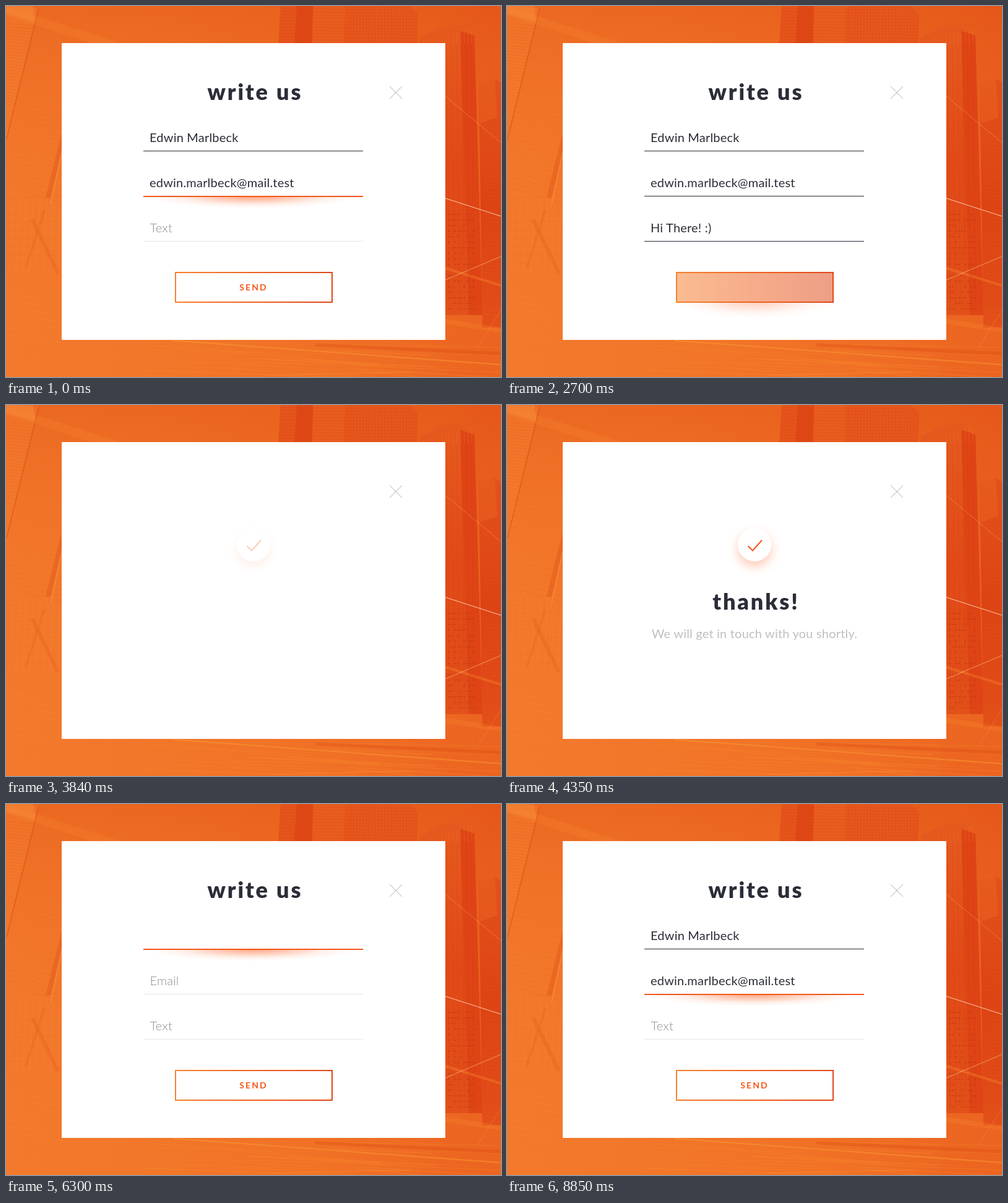
Write an HTML page with a canvas that moves like this. It is 800x600 px and loops after 8.88 s.

```html
<!DOCTYPE html>
<html lang="en">
<head>
<meta charset="utf-8">
<title>Write us</title>
<style>
html, body { margin: 0; width: 100%; height: 100%; overflow: hidden; background: #ee6b23; }
canvas, svg { position: absolute; left: 0; top: 0; display: block; }
text { font: 400 20px Lato, "Open Sans", sans-serif; letter-spacing: .2px; fill: #2b2d38; white-space: pre; }
.title { font-weight: 900; font-size: 36px; letter-spacing: 2.9px; text-anchor: middle; }
.hint { font-weight: 300; fill: #8c8c8c; }
.send { font-weight: 700; font-size: 14px; letter-spacing: 2.1px; text-anchor: middle; }
.mid { text-anchor: middle; }
</style>
</head>
<body>
<canvas id="city" width="800" height="600"></canvas>
<svg width="800" height="600" viewBox="0 0 800 600">
  <defs>
    <linearGradient id="warm">
      <stop offset="0" stop-color="#f6812f"/><stop offset=".5" stop-color="#ef6223"/><stop offset="1" stop-color="#e0481a"/>
    </linearGradient>
    <radialGradient id="glow">
      <stop offset="0" stop-color="#fd5a18" stop-opacity=".55"/>
      <stop offset=".35" stop-color="#fd5a18" stop-opacity=".32"/>
      <stop offset=".7" stop-color="#fd5a18" stop-opacity=".09"/>
      <stop offset="1" stop-color="#fd5a18" stop-opacity="0"/>
    </radialGradient>
    <filter id="soft" x="-60%" y="-60%" width="220%" height="220%"><feGaussianBlur stdDeviation="9"/></filter>
    <clipPath id="under"><rect x="222" y="1" width="356" height="24"/></clipPath>
  </defs>
  <rect x="90" y="60" width="620" height="480" fill="#fff"/>
  <path d="M620 130l20 20M640 130l-20 20" stroke="#b4b4b4" fill="none"/>
  <g id="form">
    <text class="title" x="402.4" y="152">write us</text>
    <g id="fields"></g>
    <g id="hover">
      <ellipse cx="400.5" cy="478" rx="130" ry="27" fill="url(#glow)"/>
      <rect x="274" y="431" width="253" height="48" fill="url(#warm)"/>
    </g>
    <rect x="274" y="431" width="253" height="48" fill="none" stroke="url(#warm)" stroke-width="2"/>
    <text class="send" x="400" y="460" style="fill:#f4581c">SEND</text>
    <text class="send" id="sendOn" x="400" y="460" style="fill:#fff">SEND</text>
  </g>
  <g id="thanks">
    <g id="badge">
      <circle cx="400" cy="234" r="26" fill="#fd5a18" opacity=".36" filter="url(#soft)"/>
      <circle cx="400" cy="226" r="27" fill="#fff"/>
      <path d="M389.5 228l7.5 7.5 15-17" fill="none" stroke="#f4541a" stroke-width="2"/>
    </g>
    <text class="title" id="done" x="402.4" y="331">thanks!</text>
    <text class="mid" id="note" x="400" y="376.5">We will get in touch with you shortly.</text>
  </g>
</svg>
<script>
const LOOP = 8880, TICK = 30;
// The timeline runs from the moment the blank form appears.
const SHIFT = 3480;
const FIELDS = [
  { y: 234, hint: 'Name', value: 'Edwin Marlbeck', focus: 600, typing: 720 },
  { y: 307, hint: 'Email', value: 'edwin.marlbeck@mail.test', focus: 2430, typing: 720 },
  { y: 380, hint: 'Text', value: 'Hi There! :)', focus: 4230, typing: 480 }
];
const $ = id => document.getElementById(id);
const clamp = v => Math.max(0, Math.min(1, v));
const ramp = (t, start, length) => clamp((t - start) / length);
const fade = (el, v) => el.setAttribute('opacity', v.toFixed(3));

for (const f of FIELDS) {
  const g = document.createElementNS('http://www.w3.org/2000/svg', 'g');
  g.setAttribute('transform', `translate(0 ${f.y})`);
  g.innerHTML = `<text class="hint" x="232.5" y="-14">${f.hint}</text><text x="232" y="-14"></text>
    <rect x="222" width="355" height="1"/>
    <g clip-path="url(#under)"><ellipse cx="399.5" cy="1" rx="168" ry="19" fill="url(#glow)"/></g>
    <rect x="222" width="355" height="2" fill="#f4581c"/>`;
  $('fields').append(g);
  [f.label, f.text, f.rule, f.shade, f.line] = g.children;
}

function drawField(f, t) {
  const typeAt = f.focus + 300, blur = typeAt + f.typing + 30;
  const on = ramp(t, f.focus, 300);
  const count = Math.floor(ramp(t, typeAt, f.typing) * f.value.length + 1e-6);
  f.text.textContent = f.value.slice(0, count);
  f.rule.setAttribute('fill', t >= blur ? '#2b2d38' : '#e6e6e6');
  fade(f.label, 1 - on);
  fade(f.shade, on * (1 - ramp(t, blur, 300)));
  fade(f.line, on * (1 - ramp(t, blur, 90)));
}

function draw(time) {
  const t = (Math.floor(time / TICK) * TICK + SHIFT) % LOOP;
  FIELDS.forEach(f => drawField(f, t));
  const hover = ramp(t, 5850, 630);
  fade($('hover'), hover);
  fade($('sendOn'), hover);
  fade($('form'), ramp(t, 0, 150) * (1 - ramp(t, 7080, 150)));
  fade($('badge'), ramp(t, 7230, 300));
  fade($('done'), ramp(t, 7470, 300));
  fade($('note'), ramp(t, 7740, 300));
  fade($('thanks'), 1 - ramp(t, 8730, 150));
}

function paintCity() {
  const c = $('city').getContext('2d');
  let seed = 7;
  const rnd = () => (seed = seed * 16807 % 2147483647) / 2147483647;
  const blend = (x0, y0, x1, y1, ...colors) => {
    const g = c.createLinearGradient(x0, y0, x1, y1);
    colors.forEach((k, i) => g.addColorStop(i / (colors.length - 1), k));
    return g;
  };
  const shape = (fill, ...p) => {
    c.fillStyle = fill;
    c.beginPath();
    for (let i = 0; i < p.length; i += 2) c.lineTo(p[i], p[i + 1]);
    c.fill();
  };
  const line = (color, width, x0, y0, x1, y1) => {
    c.strokeStyle = color;
    c.lineWidth = width;
    c.beginPath();
    c.moveTo(x0, y0);
    c.lineTo(x1, y1);
    c.stroke();
  };

  c.fillStyle = blend(0, 0, 800, 0, '#f2772b', '#f07327', '#ee6a22', '#e75a1c');
  c.fillRect(0, 0, 800, 600);
  c.fillStyle = blend(0, 0, 0, 600, 'rgba(226,82,20,.4)', 'rgba(245,128,48,.12)', 'rgba(246,128,48,.28)');
  c.fillRect(0, 0, 800, 600);

  // Left office block and frames
  shape('rgba(248,140,60,.22)', 0, 0, 52, 3, 0, 215);
  shape('rgba(249,150,64,.35)', 0, 0, 44, 0, 48, 26, 0, 12);
  for (let y = 28; y < 200; y += 5) line('rgba(218,82,22,.22)', 1, 0, y, 52 - y * .245, y + 4);
  line('rgba(214,76,20,.55)', 1.5, 53, 3, 1, 215);
  for (let y = 150; y < 300; y += 9) line('rgba(222,86,24,.15)', 1, 4, y, 90, y + 24);
  shape('rgba(212,72,18,.3)', 90, 205, 90, 236, 72, 310, 64, 310);
  line('rgba(250,152,76,.4)', 2, 90, 236, 72, 322);
  for (let i = 0; i < 9; i++) {
    line('rgba(250,150,74,.16)', 2, i * 11, 306 + rnd() * 16, i * 11 - 6, 430);
    line('rgba(220,80,22,.12)', 1, 0, 312 + i * 13, 90, 306 + i * 14);
  }
  line('rgba(214,76,20,.2)', 6, 42, 345, 84, 432);
  line('rgba(214,76,20,.16)', 4, 62, 330, 32, 424);
  line('rgba(250,145,56,.18)', 14, 0, 8, 200, 72);

  // Top centre tower
  shape('#e4541b', 444, 0, 654, 0, 666, 14, 664, 60, 440, 60);
  shape('#de4816', 470, 0, 496, 0, 494, 60, 466, 60);
  shape('rgba(240,112,42,.32)', 497, 0, 548, 0, 546, 60, 495, 60);
  for (let x = 550; x < 664; x += 5) line('rgba(240,112,44,.3)', 1, x, 0, x - 1, 60);
  for (let y = 4; y < 60; y += 5) line('rgba(214,62,16,.22)', 1, 442, y, 664, y + 3);

  // Right towers
  shape(blend(0, 30, 0, 500, '#e55a1e', '#e04817', '#e2501a'), 668, 60, 670, 50, 704, 34, 738, 29, 744, 42, 757, 48, 770, 500, 668, 500);
  shape('#de4415', 734, 40, 757, 48, 770, 500, 748, 500);
  for (let x = 674; x < 754; x += 6) line('rgba(244,126,52,.32)', 1, x, 60 - (x - 668) * .3, x + 1, 62);
  for (let y = 62; y < 330; y += 4) line('rgba(242,112,44,.2)', 1, 710, y, 735 + y * .02, y + 2);
  shape(blend(0, 118, 0, 520, '#e2511b', '#dd4314', '#e14d18'), 764, 124, 790, 118, 800, 124, 800, 520, 770, 520);
  shape('rgba(241,116,42,.28)', 764, 124, 790, 118, 794, 180, 766, 190);
  for (let x = 712; x < 760; x += 8) line('rgba(200,52,12,.2)', 1, x, 62, x + 5, 490);
  for (let y = 336; y < 490; y += 9) {
    for (let x = 714; x < 758; x += 5) {
      if (rnd() > .4) shape('rgba(178,46,12,.38)', x, y, x + 3, y, x + 3, y + 2, x, y + 2);
    }
  }
  for (let y = 150; y < 500; y += 6) line('rgba(240,110,42,.12)', 1, 772, y, 800, y + 2);

  // Light trails
  c.fillStyle = blend(0, 480, 0, 600, 'rgba(238,104,32,0)', 'rgba(236,100,30,.5)');
  c.fillRect(700, 480, 100, 120);
  for (let i = 0; i < 26; i++) {
    const x = 180 + rnd() * 420, y = 538 + rnd() * 56;
    line(`rgba(250,146,48,${(.08 + rnd() * .2).toFixed(2)})`, .6 + rnd() * 1.6, x, y, x + 130 + rnd() * 280, y + 4 + rnd() * 14);
  }
  for (let i = 0; i < 7; i++) line('rgba(250,146,54,.22)', 1, 0, 466 + i * 11, 90, 478 + i * 11);
  line('rgba(252,156,52,.5)', 2, 270, 541, 800, 580);
  line('rgba(214,70,16,.3)', 5, 500, 548, 800, 562);
  line('rgba(250,150,60,.5)', 1.2, 420, 597, 655, 592);
  line('rgba(250,140,48,.35)', 4, 710, 424, 800, 452);
  line('rgba(250,140,48,.22)', 8, 710, 510, 800, 524);
  line('rgba(255,226,196,.85)', 1, 710, 311, 800, 340);
  line('rgba(255,200,150,.6)', 1, 710, 443, 800, 405);
  line('rgba(255,196,140,.35)', 1, 710, 146, 800, 221);
  line('rgba(255,180,110,.25)', 1, 762, 552, 800, 492);
}

paintCity();
const start = performance.now();
function loop() {
  draw(performance.now() - start);
  requestAnimationFrame(loop);
}
loop();
</script>
</body>
</html>
```
